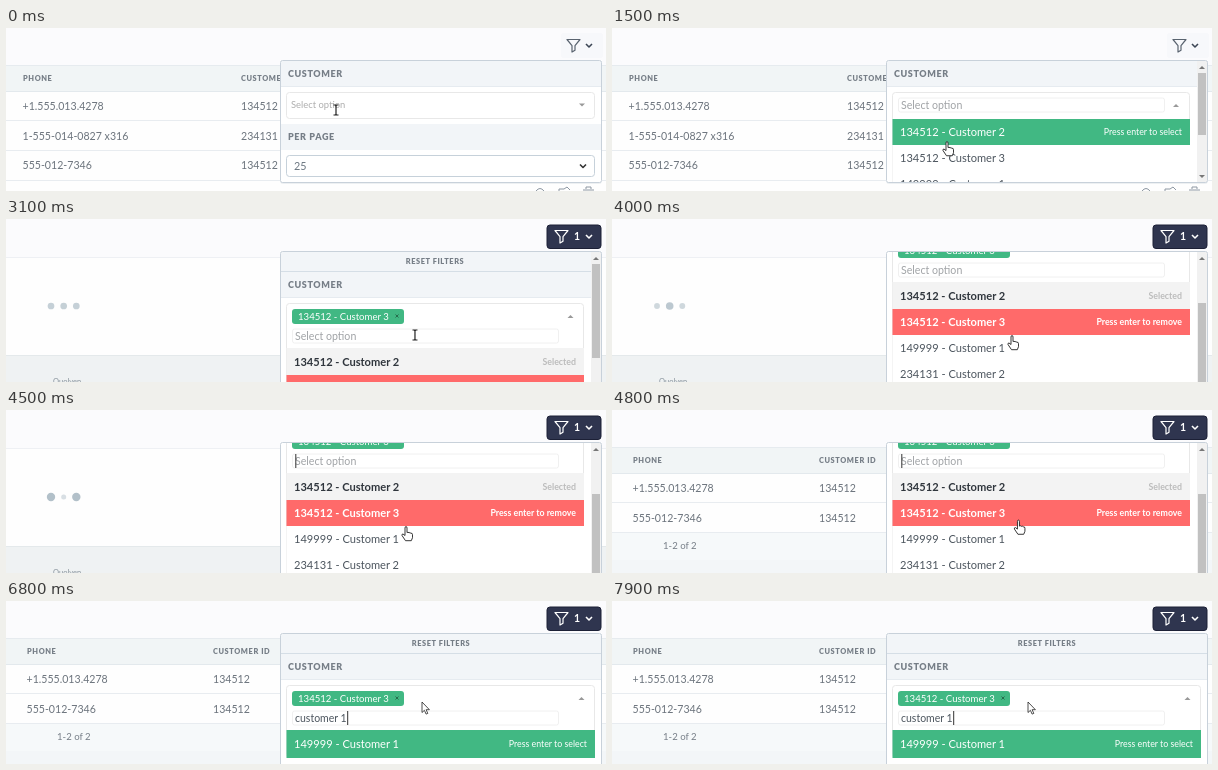
Write an HTML page that moves like this. It is 600x163 px and loops after 8 s.

```html
<!DOCTYPE html>
<html lang="en">
<head>
<meta charset="utf-8">
<title>Table filter</title>
<style>
  html, body { margin: 0; width: 100%; height: 100%; overflow: hidden; background: #fbfbfd; }
  svg { display: block; }
  text { font-family: Lato, "Open Sans", sans-serif; white-space: pre; }
</style>
</head>
<body>
<svg id="stage" width="600" height="163" viewBox="0 0 600 163"></svg>
<script>
const LOOP = 8000;
const OPEN = 900, HOVER = 1600, PICK = 2100, LOADED = 4800, FILTER = 6800;
const GREEN = '#41b883', RED = '#ff6a6a', INK = '#4c555e', HEAD = '#f2f5f8', EDGE = '#c8d1da';
const stage = document.getElementById('stage');
const pen = document.createElement('canvas').getContext('2d');

const rect = (x, y, w, h, fill, more = '') =>
  `<rect x="${x}" y="${y}" width="${w}" height="${h}" fill="${fill}" ${more}/>`;
const text = (x, y, size, fill, str, more = '') =>
  `<text x="${x}" y="${y}" font-size="${size}" fill="${fill}" ${more}>${str}</text>`;
const path = (d, color, width = 1, fill = 'none') =>
  `<path d="${d}" fill="${fill}" stroke="${color}" stroke-width="${width}" stroke-linejoin="round"/>`;
const line = (x1, x2, y, color) => rect(x1, y, x2 - x1, 1, color);
const BOLD = 'font-weight="700"', END = 'text-anchor="end"';
const caps = (x, y, size, str, more = '') =>
  text(x, y, size, '#767e87', str, `font-weight="900" letter-spacing=".6" ${more}`);
const triangle = (x, y, up, color) => path(`M${x - 3} ${y}h6l-3 ${up ? -3 : 3}z`, 'none', 0, color);
const chevron = (x, y, color) => path(`M${x - 3} ${y - 1.5}l3 3 3-3`, color, 1.6);
const outline = color => `stroke="${color}" stroke-width="1"`;

// Piecewise motion through [time, x, y] points
const track = [[0, 330, 82], [1300, 330, 82], [1500, 335, 114], [1800, 336, 129], [2700, 336, 129],
  [3100, 409, 116], [3500, 400, 117], [4600, 400, 117], [5100, 416, 101], [LOOP, 416, 101]];
function along(t) {
  const i = track.findIndex(p => p[0] > t);
  const [a, b] = [track[i - 1], track[i]];
  const k = (t - a[0]) / (b[0] - a[0]);
  return [a[1] + (b[1] - a[1]) * k, a[2] + (b[2] - a[2]) * k];
}

function cursor(t) {
  const [x, y] = along(t);
  let shape;
  if (t < 1350 || (t >= 2900 && t < 3700)) {
    shape = path('M-2.5 -5 L-.7 -5 L0 -4.3 L.7 -5 L2.5 -5 M0 -4.3 V4.3 M-2.5 5 L-.7 5 L0 4.3 L.7 5 L2.5 5', '#222', 1.2);
  } else if (t < FILTER) {
    shape = path('M-1 1q0 -1.5 1 -1.5t1 1.5V5.5q1 -.8 2 .3 1 -.6 1.8 .4 1.7 -.3 1.7 1.5v3l-1.2 3H-.5L-4 8.5q-.5 -1.5 1 -1.5l2 1.5z',
      '#222', .9, '#fff');
  } else {
    shape = path('M0 0V10.5l2.4 -2.2 1.7 3.8 1.7 -.7 -1.7 -3.7h3.3z', '#222', .8, '#fff');
  }
  return `<g transform="translate(${x} ${y})">${shape}</g>`;
}

function button(t) {
  const on = t >= PICK, x = on ? 549 : 561, color = on ? '#fff' : '#59636f';
  return (on ? rect(541, 6, 54, 23.5, '#2f354f', `${outline('#1c2036')} rx="3"`) : rect(555, 5, 42, 25, '#f7f8fb', 'rx="3"')) +
    path(`M${x} 11.5h13l-5 6.2v4.5l-3 1.8v-6.3z`, color, 1.2) +
    (on ? text(568, 21, 10.5, '#fff', '1', BOLD) : '') + chevron(583, 17.5, on ? color : '#3c4655');
}

function grid(x1, x2, rows) {
  return rect(0, 37, 600, 126, '#fefefe') + rect(0, 37, 600, 27, '#f1f5f6') +
    line(0, 600, 37, '#e6ebef') + line(0, 600, 63, '#e3e9ed') +
    caps(x1, 53, 7.4, 'PHONE') + caps(x2, 53, 7.4, 'CUSTOMER ID') +
    rows.map(([phone, id], i) => line(0, 600, 92 + 30 * i, '#e8ecf0') +
      text(x1 - .5, 82 + 29.5 * i, 10.6, '#6c747d', phone) +
      text(x2, 82 + 29.5 * i, 10.6, '#6c747d', id)).join('');
}

function loader(t) {
  const k = Math.abs(((t - PICK) % 800) / 400 - 1);
  const dot = (x, k) => `<circle cx="${x}" cy="87" r="${2.5 + 1.7 * k}" fill="#b2c0c9" opacity="${.5 + .5 * k}"/>`;
  return rect(0, 38, 600, 98, '#fefefe') + line(0, 600, 38, '#eef0f4') +
    rect(0, 136, 600, 27, '#eff2f3') + line(0, 600, 136, '#e4e9eb') +
    dot(45, k) + dot(57.7, 1 - k) + dot(70.3, k) + text(47, 165, 7.5, '#87929b', 'Quolven');
}

function page(t) {
  if (t < PICK) {
    return grid(17, 235, [['+1.555.013.4278', '134512'], ['1-555-014-0827 x316', '234131'], ['555-012-7346', '134512']]) +
      path('M530 163q4 -5 8 0M553 163v-2h5l3 -2 3 3M577 162h11M580 161v-2h5v2', '#8d97a2', 1);
  }
  if (t < LOADED) return loader(t);
  return grid(21, 207, [['+1.555.013.4278', '134512'], ['555-012-7346', '134512']]) +
    rect(0, 123, 600, 27, '#f6f9fa') + text(51, 139, 9.6, '#767e87', '1-2 of 2') +
    rect(0, 150, 600, 13, '#f3f6f8');
}

// kind: '' plain, 'pick' green, 'drop' red, 'kept' already selected
function item(y, right, label, kind = '', h = 26) {
  const fill = { pick: GREEN, drop: RED, kept: '#f3f3f3' }[kind] || '#fff';
  const hint = { pick: 'Press enter to select', drop: 'Press enter to remove', kept: 'Selected' }[kind] || '';
  const lit = kind === 'pick' || kind === 'drop';
  const weight = kind === 'drop' || kind === 'kept' ? BOLD : '';
  const base = y + h / 2 + 4;
  return rect(280.5, y, right - 280.5, h, fill) +
    text(288, base, 11.1, lit ? '#fff' : weight ? '#30363d' : INK, label, weight) +
    text(right - 8, base - 1, 8.8, lit ? '#fff' : '#bcbcbc', hint, `${END} ${weight}`);
}

function entry(y, typed, caret) {
  pen.font = '10.5px Lato, "Open Sans", sans-serif';
  const x = 289 + pen.measureText(typed).width;
  return rect(286.5, y - 7, 266, 14, '#fff', `${outline('#f0f0f0')} rx="2"`) +
    (typed ? text(289, y + 4, 10.5, INK, typed) : text(289, y + 4, 10.6, '#a0a3a6', 'Select option')) +
    (caret ? rect(x + .3, y - 7, 1, 14, '#333') : '');
}

function scrollbar(bottom, top, size) {
  return rect(585, 33, 10, bottom - 33, '#f1f1f1') + rect(586, top, 8, size, '#c1c1c1') +
    triangle(590, 41, true, '#777');
}

function typedAt(t) {
  if (t < 5500) return '';
  if (t < 6000) return 'c';
  return 'customer 1'.slice(0, t < FILTER ? Math.min(9, 2 + Math.floor((t - 6000) / 100)) : 10);
}

function caretAt(t) {
  if (t < PICK) return false;
  if (t >= FILTER) return t < 7300 || t >= 7900;
  return t >= 5500 || (t - PICK) % 1200 < 600;
}

function closedPanel() {
  return rect(275, 33, 321, 25, HEAD) + caps(282, 49, 9, 'CUSTOMER') + line(275, 596, 58, '#e6ebf0') +
    rect(280.5, 64.5, 308, 26, '#fff', `${outline('#e8e8e8')} rx="3"`) +
    text(285, 80, 9.4, '#adadad', 'Select option') + triangle(576, 75.5, false, '#999') +
    rect(275, 96, 321, 26, HEAD) + caps(282, 112, 9, 'PER PAGE') +
    rect(280.5, 127.5, 308, 21, '#fff', `${outline('#c6d1da')} rx="3"`) +
    text(288, 141.8, 10.8, '#6b7680', '25') + chevron(577, 138, '#333');
}

function openPanel(t) {
  const low = t >= HOVER;
  return rect(275, 33, 321, 25, HEAD) + caps(282, 49, 9, 'CUSTOMER') + line(275, 596, 58, '#e6ebf0') +
    rect(280.5, 64.5, 297, 95, '#fff', `${outline('#e8e8e8')} rx="3"`) +
    entry(77, '', false) + triangle(564, 79, true, '#999') +
    item(91, 578, '134512 - Customer 2', low ? '' : 'pick') +
    item(117, 578, '134512 - Customer 3', low ? 'pick' : '') +
    item(143, 578, '149999 - Customer 1') +
    scrollbar(154, 45, 62) + triangle(590, 147, false, '#777');
}

function pickedPanel(t) {
  const done = t >= FILTER;
  const right = done ? 589 : 578, mid = done ? 435 : 429;
  const s = Math.min(1, Math.max(0, (t - 3700) / 200));
  const k = done ? 0 : s * s * (3 - 2 * s);
  const body = rect(275, 33, 321, 19, HEAD) +
    caps(mid, 45, 7.4, 'RESET FILTERS', 'text-anchor="middle"') + line(275, 596, 52, '#d5dee6') +
    rect(275, 53, 321, 25, HEAD) + caps(282, 69, 9, 'CUSTOMER') + line(275, 596, 78, '#e6ebf0') +
    rect(280.5, 84.5, right - 281, done ? 72 : 180, '#fff', `${outline('#e8e8e8')} rx="3"`) +
    rect(286, 90, 112, 15, GREEN, 'rx="3"') + text(292, 101, 9.6, '#fff', '134512 - Customer 3') +
    path('M389.5 95.5l3 3m0 -3l-3 3', '#266d4d', 1) + triangle(right - 13.5, 99, true, '#999') +
    entry(117, typedAt(t), caretAt(t)) +
    (done ? item(129, right, '149999 - Customer 1', 'pick', 28) :
      item(129, right, '134512 - Customer 2', 'kept', 27) +
      item(156, right, '134512 - Customer 3', 'drop') +
      item(182, right, '149999 - Customer 1') +
      item(208, right, '234131 - Customer 2'));
  return `<g transform="translate(0 ${-66 * k})">${body}</g>` +
    (done ? '' : scrollbar(163, 45 + 39 * k, 94));
}

function panel(t) {
  const h = t < PICK ? 122 : 140;
  const body = t < OPEN ? closedPanel() : t < PICK ? openPanel(t) : pickedPanel(t);
  return rect(274, 33, 322, h + 1, '#8fa0b0', 'opacity=".15" rx="3"') +
    `<svg x="274" y="32" width="322" height="${h}" viewBox="274 32 322 ${h}">${rect(274, 32, 322, h, '#fff')}${body}</svg>` +
    rect(274.5, 32.5, 321, h, 'none', `${outline(EDGE)} rx="2"`);
}

const start = performance.now();
function draw() {
  const t = (performance.now() - start) % LOOP;
  stage.innerHTML = rect(0, 0, 600, 163, '#fbfbfd') + page(t) + button(t) + panel(t) + cursor(t);
  requestAnimationFrame(draw);
}
draw();
</script>
</body>
</html>
```
